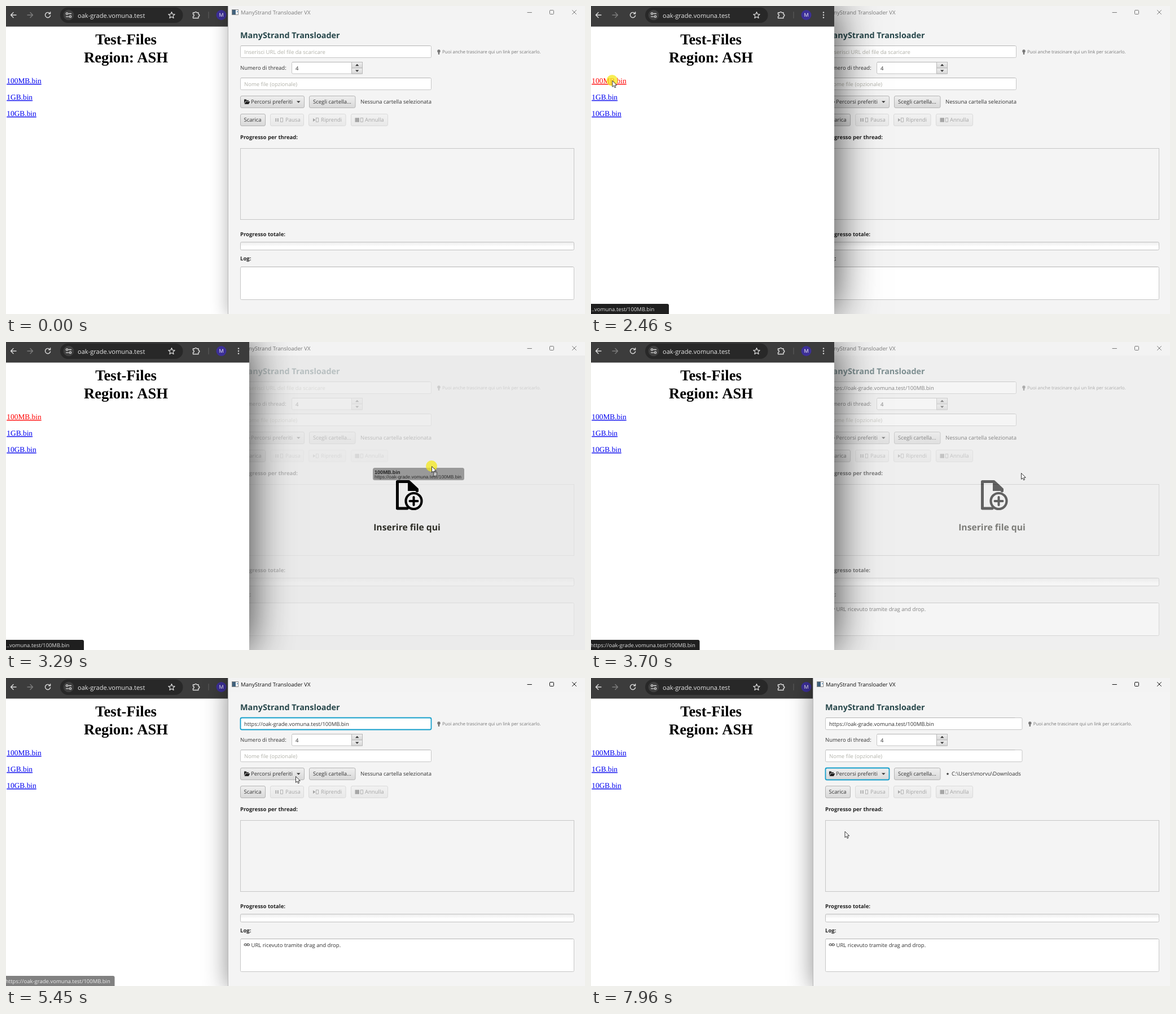
Write an HTML page that moves like this. It is 1026 by 546 pixels and loops after 8000 ms.

```html
<!DOCTYPE html>
<html lang="it">
<head>
<meta charset="utf-8">
<title>Downloader</title>
<style>
  html, body { margin: 0; width: 100%; height: 100%; overflow: hidden; background: #fff; }
  #stage { position: relative; width: 1026px; height: 546px; overflow: hidden; }
  .win { position: absolute; top: 0; height: 546px; }
  .win svg { display: block; width: 100%; height: 100%; }
  #web { left: 0; width: 431px; background: #fff; box-shadow: 0 0 72px rgba(0,0,0,.8); }
  #app { left: 393px; width: 633px; z-index: 2; background: #f4f4f4; }
  #top { left: 0; width: 1026px; z-index: 9; }
  text { font: 9.52px "Open Sans", "Noto Sans", sans-serif; fill: #333; text-rendering: geometricPrecision; white-space: pre; }
  .b { font-weight: 700; fill: #222; }
  .ph { fill: #b2b2aa; }
  .h1 { font: 700 26.7px "Liberation Serif", serif; fill: #000; text-anchor: middle; }
  .link { font: 13.4px "Liberation Serif", serif; fill: #00e; text-decoration: underline; }
  .ln { fill: none; stroke-linecap: round; stroke-linejoin: round; }
  .off { opacity: .4; }
</style>
</head>
<body>
<div id="stage">
  <div class="win" id="web"></div>
  <div class="win" id="app"></div>
  <div class="win" id="top"></div>
</div>
<script>
const HOST = 'oak-grade.vomuna.test';
const URL_TEXT = `https://${HOST}/100MB.bin`;
const NAME = 'ManyStrand Transloader';
const HOME = 'C:\\Users\\morvu\\';

const $ = id => document.getElementById(id);
const text = (x, y, s, a = '') => `<text x="${x}" y="${y}" ${a}>${s}</text>`;
const rect = (x, y, w, h, a = '') => `<rect x="${x}" y="${y}" width="${w}" height="${h}" ${a}/>`;
const path = (d, a = '') => `<path d="${d}" ${a}/>`;
const line = (d, color, w = 1, a = '') => path(d, `class="ln" stroke="${color}" stroke-width="${w}" ${a}`);
const circle = (x, y, r, a) => `<circle cx="${x}" cy="${y}" r="${r}" ${a}/>`;
const group = (id, s) => `<g id="${id}">${s}</g>`;
const svg = (box, s) => `<svg viewBox="${box}">${s}</svg>`;

const field = (x, y, w, h, id = '') =>
  rect(x + .5, y + .5, w - 1, h - 1, `id="${id}" rx="2" fill="#fff" stroke="#c6c6c6"`) +
  line(`M${x + 2} ${y + .5}H${x + w - 3}`, '#b4b4b4');
const button = (x, y, w, h, s) =>
  rect(x + .5, y + .5, w - 1, h - 1, 'rx="2.5" fill="url(#face)" stroke="#b4b4b4"') + s;
const ring = (id, x, y, w, h) =>
  rect(x, y, w, h, `id="${id}" rx="2.5" fill="none" stroke="#159fcb" stroke-width="1.8"`);
const tofu = x => rect(x + .5, 198.5, 4, 7, 'fill="none" stroke="#333" stroke-width=".8"');
const star = (x, y, r, a = '') => {
  let d = '';
  for (let i = 0; i < 10; i++) {
    const q = i * Math.PI / 5, k = i % 2 ? r * .45 : r;
    d += `${i ? 'L' : 'M'}${(x + k * Math.sin(q)).toFixed(2)} ${(y - k * Math.cos(q)).toFixed(2)}`;
  }
  return path(d + 'Z', a);
};

// Browser window
$('web').innerHTML = svg('0 0 431 546', [
  rect(0, 0, 431, 36.5, 'fill="#3c3c3c"'),
  line('M18 16H8.5M13 11.5L8.5 16L13 20.5', '#dcdcdc', 1.4),
  line('M38 16H47.5M43 11.5L47.5 16L43 20.5', '#7d7d7d', 1.4),
  line('M77.6 13A4.6 4.6 0 1 0 78.6 17M78.6 10.8V13.8H75.6', '#dcdcdc', 1.4),
  rect(96, 2.5, 217.5, 27.5, 'rx="13.7" fill="#282828"'),
  circle(111, 16, 9.3, 'fill="#3f3f3f"'),
  line('M111 13.5H115.5M106.5 18.8H111', '#dcdcdc', 1.3),
  circle(108, 13.5, 1.7, 'class="ln" stroke="#dcdcdc" stroke-width="1.2"'),
  circle(114, 18.8, 1.7, 'class="ln" stroke="#dcdcdc" stroke-width="1.2"'),
  text(127, 20.5, HOST, 'style="font-size:11.09px;fill:#e6e6e6"'),
  star(293.5, 16.6, 6, 'class="ln" stroke="#dcdcdc" stroke-width="1.2"'),
  line('M331.5 11.8H334.5A1.8 1.8 0 0 1 338 11.8H341V14.8A1.8 1.8 0 0 1 341 18.4V21.5H331.5V18.4A1.8 1.8 0 0 0 331.5 14.8Z', '#dcdcdc', 1.4),
  line('M359 10.5V21.5', '#606060'),
  circle(381.5, 16, 9, 'fill="#3c2f97"'),
  text(381.5, 19.3, 'M', 'text-anchor="middle" style="font-size:9px;fill:#fff"'),
  [11.5, 16, 20.5].map(y => circle(412, y, 1.2, 'fill="#dcdcdc"')).join(''),
  text(212.5, 68, 'Test-Files', 'class="h1"'),
  text(212.5, 100, 'Region: ASH', 'class="h1"'),
  ['100MB', '1GB', '10GB'].map((s, i) => text(1.3, 137 + 29 * i, s + '.bin', `class="link" id="link${i}"`)).join(''),
  group('status',
    rect(-4, 528, 142, 22, 'id="bar" rx="3" fill="#1f1f1f"') +
    text(1, 541, '..vomuna.test/100MB.bin', 'id="brief" style="fill:#ddd"') +
    text(-1, 541, URL_TEXT, 'id="full" style="fill:#ddd"'))
].join(''));

// Downloader window
const titleBar = group('caption', [
  text(416, 14.8, NAME + ' VX', 'style="font-size:9.6px;fill:inherit"'),
  line('M924 11.5H931.5', 'currentColor'),
  rect(963.5, 7.5, 7, 7, 'class="ln" rx="1" stroke="currentColor"'),
  line('M1003.5 7.5L1010.5 14.5M1010.5 7.5L1003.5 14.5', 'currentColor')
].join(''));

const dropIcon =
  line('M728.5 264V261L714 247.5H693.5V295H711', '#000', 5) +
  path('M712 247V264H730Z') +
  circle(722.5, 282, 14, 'fill="#ececec" stroke="#000" stroke-width="4.2"') +
  line('M715.5 282H729.5M722.5 275V289', '#000', 4);

const items = ['Downloads', 'Desktop', 'Documents', 'Pictures'];
const menu = group('menu', [
  rect(416.5, 182.5, 166, 88, 'fill="#f6f6f6" stroke="#c4c4c4" filter="url(#soft)"'),
  rect(417, 186, 165, 20, 'id="hover" fill="#0096c9"'),
  items.map((s, i) => `<g id="item${i}" fill="#333">` +
    star(431, 196.3 + 20 * i, 2.6) +
    text(438, 199.6 + 20 * i, HOME + s, 'style="fill:inherit"') + '</g>').join('')
].join(''));

$('app').innerHTML = svg('393 0 633 546', [
  `<defs>
    <linearGradient id="face" x2="0" y2="1"><stop stop-color="#efefef"/><stop offset="1" stop-color="#d8d8d8"/></linearGradient>
    <linearGradient id="dip" x2="0" y2="1"><stop stop-color="#ececec"/><stop offset=".6" stop-color="#fff"/></linearGradient>
    <filter id="soft" x="-10%" y="-10%" width="120%" height="130%"><feDropShadow dx="0" dy="2" stdDeviation="3" flood-opacity=".25"/></filter>
  </defs>`,
  rect(393, 0, 633, 24, 'fill="#f3f3f3"'),
  line('M393.5 0V546', '#b9b9b9'),
  rect(400.5, 6.5, 11, 9, 'fill="#fff" stroke="#8a8a8a"'),
  rect(401, 7, 6, 8, 'fill="#41627c"'),
  rect(409, 9, 1.5, 2, 'fill="#5792c6"'),
  titleBar,
  text(415, 57.2, NAME, 'class="b" style="font-size:14.4px;fill:#27474b"'),
  field(415, 70, 339, 22, 'urlBox'),
  text(422, 85, 'Inserisci URL del file da scaricare', 'class="ph" id="urlHint"'),
  text(422, 85, URL_TEXT, 'id="url"'),
  ring('urlRing', 415.5, 70.5, 338, 21),
  line('M421.5 76V87', '#222', 1, 'id="caret"'),
  group('tip',
    circle(767, 80, 2.7, 'fill="#777"') + rect(765.8, 82, 2.4, 4, 'fill="#777"') +
    text(773, 84.2, 'Puoi anche trascinare qui un link per scaricarlo.', 'style="font-size:7.94px;fill:#777"')),
  text(415, 113, 'Numero di thread:'),
  field(506, 99, 126, 21.5),
  rect(612.5, 99.5, 19, 10.5, 'fill="url(#face)" stroke="#b8b8b8"'),
  rect(612.5, 110, 19, 10, 'fill="url(#face)" stroke="#b8b8b8"'),
  path('M619 106.2H625.4L622.2 102.8ZM619 113.4H625.4L622.2 116.8Z', 'fill="#333"'),
  text(513, 113.5, '4'),
  field(415, 127, 339, 22, 'nameBox'),
  text(422, 142, 'Nome file (opzionale)', 'class="ph"'),
  button(415, 159, 114, 22,
    path('M422 173V165.5H425.5L426.5 167H430V168.5H424.5ZM422.6 174L425 169.2H432.4L430 174Z', 'fill="#222"') +
    text(434, 173, 'Percorsi preferiti') +
    path('M515 168.4H521.6L518.3 171.8Z', 'fill="#333"')),
  ring('menuRing', 415.5, 159.5, 113, 21),
  button(537, 159, 82.5, 22, text(544, 173, 'Scegli cartella...')),
  text(628, 173, 'Nessuna cartella selezionata', 'id="noDir"'),
  group('dir', star(632, 170, 2.6, 'fill="#333"') + text(639, 173, HOME + items[0])),
  button(415, 191, 45, 22, text(421.5, 205.4, 'Scarica')),
  `<g class="off">`,
  button(468, 191, 60, 22, rect(477.5, 199, 1.7, 6, 'fill="#333"') + rect(481, 199, 1.7, 6, 'fill="#333"') + tofu(486) + text(495, 205.4, 'Pausa')),
  button(536, 191, 66.5, 22, path('M544 199L548.5 202L544 205Z', 'fill="#333"') + tofu(549) + text(558, 205.4, 'Riprendi')),
  button(611, 191, 66, 22, rect(618.5, 198.3, 7.5, 7.5, 'fill="#333"') + tofu(628) + text(636, 205.4, 'Annulla')),
  '</g>',
  text(415, 235.8, 'Progresso per thread:', 'class="b"'),
  rect(415.5, 252.5, 591, 126, 'fill="#f4f4f4" stroke="#c6c6c6"'),
  text(415, 407.5, 'Progresso totale:', 'class="b"'),
  rect(415.5, 418.5, 591, 14, 'rx="2" fill="url(#dip)" stroke="#c0c0c0"'),
  text(415, 451.3, 'Log:', 'class="b"'),
  field(415, 462, 592, 59),
  group('log',
    rect(422, 471.3, 5, 3.2, 'class="ln" rx="1.6" stroke="#333"') +
    rect(426.6, 471.3, 5, 3.2, 'class="ln" rx="1.6" stroke="#333"') +
    text(434.5, 476.6, 'URL ricevuto tramite drag and drop.')),
  menu,
  group('drop',
    rect(394, 24, 632, 522, 'fill="#e8e8e8" fill-opacity=".75"') + dropIcon +
    text(710.5, 333.8, 'Inserire file qui', 'class="b" text-anchor="middle" style="font-size:15.7px;fill:#2d2d26"'))
].join(''));

// Pointer, press mark and drag label
const arial = '"Liberation Sans", Arial, sans-serif';
$('top').innerHTML = svg('0 0 1026 546',
  group('ghost',
    rect(0, 0, 162, 22, 'rx="3.5" fill="#5a5a5a" fill-opacity=".56"') +
    text(3, 10.6, '100MB.bin', `style='font:700 9.1px ${arial};fill:#222'`) +
    text(3, 19.3, URL_TEXT, `style='font:8.43px ${arial};fill:#2a2a2a'`)) +
  group('mouse',
    circle(0, 0, 10, 'id="press" fill="#f4e81c" fill-opacity=".75"') +
    group('ban', circle(0, 0, 4.6, 'class="ln" stroke="#a07a10" stroke-width="1.5"') + line('M-3.2 -3.2L3.2 3.2', '#a07a10', 1.5)) +
    group('arrow', path('M.5 .5V11.3L3 9L4.7 12.8L6.5 12L4.9 8.3H8.3Z', 'fill="#fff" stroke="#222" stroke-width=".9" stroke-linejoin="round"')) +
    group('file', rect(3.5, 10.5, 6, 7, 'fill="#ddd" fill-opacity=".6" stroke="#444" stroke-width=".9"'))));

const LOOP = 8000;
const tracks = [];

// Held values: [ms, value]
const swap = (id, prop, ...steps) =>
  tracks.push({ style: $(id).style, prop, steps, put: v => v });
// Blended numbers: [ms, number, ...], turned into a style by put
const blend = (id, prop, put, ...steps) =>
  tracks.push({ style: $(id).style, prop, steps, put, smooth: true });

const show = (id, ...spans) =>
  swap(id, 'opacity', [0, 0], ...spans.flatMap(([a, b]) => [[a, 1], [b, 0]]));
const fade = (id, ...steps) => blend(id, 'opacity', v => v, ...steps);
const move = (id, ...steps) =>
  blend(id, 'transform', (x, y) => `translate(${x}px, ${y}px)`, ...steps);

function valueAt({ steps, smooth, put }, t) {
  const next = steps.findIndex(s => s[0] > t);
  const [t0, ...from] = steps[next < 0 ? steps.length - 1 : Math.max(next - 1, 0)];
  if (!smooth || next < 1) return put(...from);
  const [t1, ...to] = steps[next];
  const k = (t - t0) / (t1 - t0);
  return put(...from.map((v, i) => v + (to[i] - v) * k));
}

const PRESS = 2250, DRAG = 2590, ENTER = 2960, DROP = 3640, FRONT = 4800, OPEN = 6520, PICK = 7710;

swap('web', 'zIndex', [0, 1], [PRESS, 3], [FRONT, 1]);
swap('app', 'boxShadow', [0, '0 3px 28px rgba(0,0,0,.3)'], [FRONT, '0 4px 40px rgba(0,0,0,.45)']);
swap('link0', 'fill', [0, '#00e'], [PRESS, '#f00'], [DROP, '#00e']);
swap('caption', 'fill', [0, '#7c7c7c'], [FRONT, '#111']);
swap('caption', 'color', [0, '#777'], [FRONT, '#111']);

fade('status', [2110, 0], [2200, 1], [5380, 1], [5540, 0]);
blend('bar', 'width', w => w + 'px', [3500, 142], [3600, 196.5]);
show('brief', [0, 3560]);
show('full', [3560, LOOP]);

fade('drop', [ENTER, 0], [ENTER + 150, 1], [DROP, 1], [DROP + 150, 0]);
show('urlHint', [0, DROP]);
show('url', [DROP, LOOP]);
show('log', [DROP, LOOP]);
show('urlRing', [FRONT, OPEN]);
show('caret', [FRONT, 5300], [5800, 6265]);

show('menuRing', [OPEN, LOOP]);
show('menu', [OPEN, PICK]);
show('hover', [7030, PICK]);
swap('item0', 'fill', [0, '#333'], [7030, '#fff']);
show('noDir', [0, PICK]);
show('dir', [PICK, LOOP]);
for (const id of ['urlBox', 'nameBox']) swap(id, 'width', [0, '338px'], [PICK, '348.5px']);
swap('tip', 'transform', [0, 'none'], [PICK, 'translate(10.8px, 0px)']);

show('mouse', [590, LOOP]);
show('press', [PRESS, DROP], [4750, 4850], [6490, 6560], [7690, 7760]);
show('ban', [DRAG, ENTER]);
show('arrow', [0, DRAG], [ENTER, LOOP]);
show('file', [ENTER, DROP]);
show('ghost', [DRAG, DROP]);

move('mouse',
  [590, 978, 530], [800, 690, 390], [1000, 320, 190], [1130, 90, 80], [1240, 12, 150], [1340, 86, 233],
  [1700, 86, 233], [1900, 31, 142], [1975, 31, 142], [2130, 36, 132], [DRAG, 38, 132],
  [2700, 140, 110], [2865, 350, 80], [2945, 350, 80], [3100, 560, 135], [3285, 754, 220], [3355, 754, 220],
  [3430, 762, 232], [4230, 762, 232], [4400, 752, 90], [4570, 741, 8],
  [4860, 741, 8], [5040, 604, 48], [5200, 552, 120], [5440, 513, 174], [5515, 513, 174],
  [5800, 512, 220], [5870, 510, 222], [6080, 490, 172],
  [6890, 490, 172], [7370, 455, 200], [7710, 455, 200], [7950, 449.5, 271.5]);
move('ghost',
  [DRAG, 24, 110], [2700, 110, 95], [2865, 295, 70], [2945, 295, 70], [3100, 470, 135],
  [3285, 650, 223], [3355, 650, 223], [3430, 665, 234]);

function render(t) {
  for (const track of tracks) track.style[track.prop] = valueAt(track, t);
}

let start;
function tick(now) {
  start ??= now;
  render((now - start) % LOOP);
  requestAnimationFrame(tick);
}
render(0);
requestAnimationFrame(tick);
</script>
</body>
</html>
```
